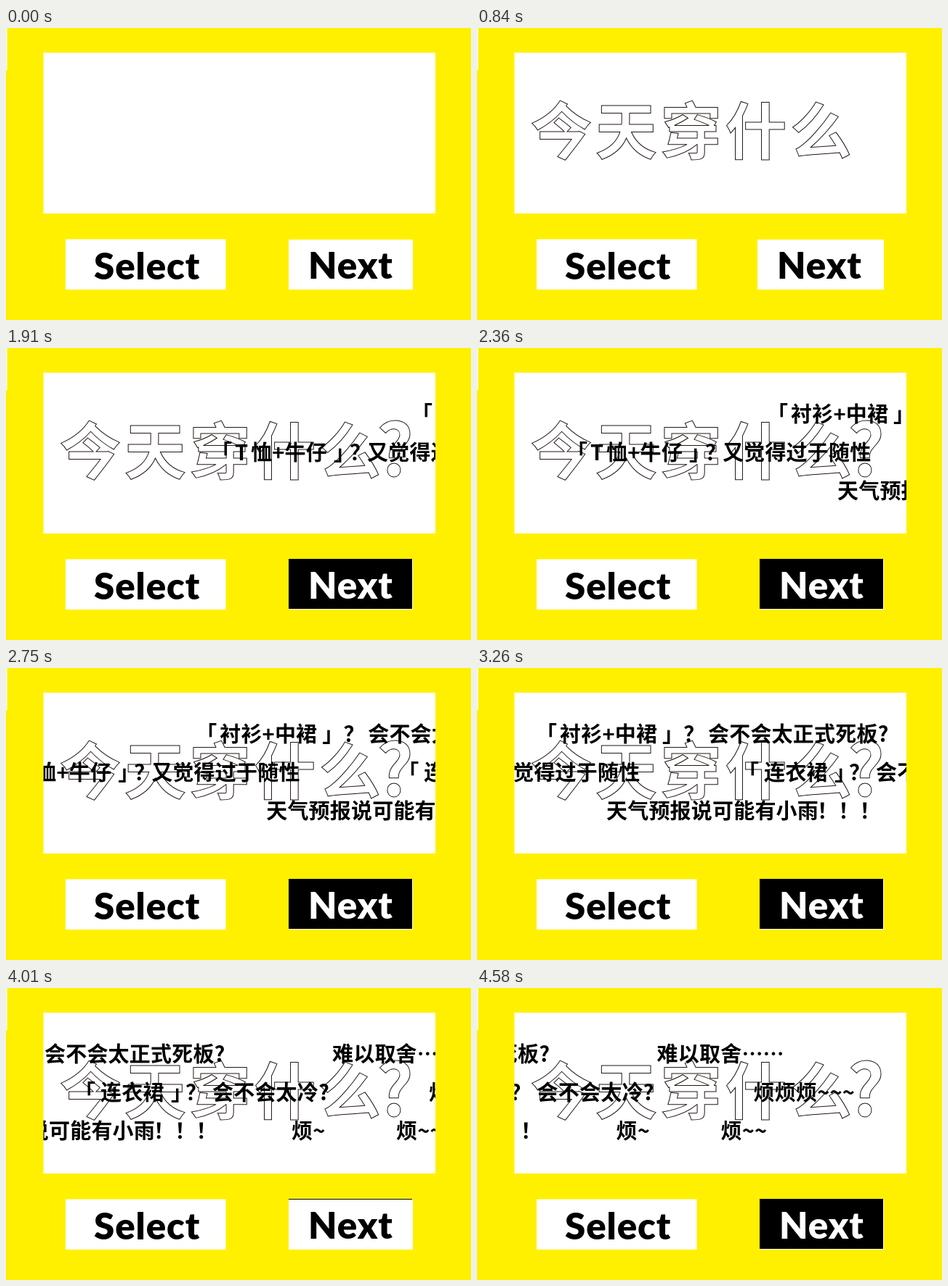
These frames come from a looping animation (640x403 px, 4610 ms). An HTML page:

```html
<!DOCTYPE html>
<html lang="zh-CN">
<head>
<meta charset="utf-8">
<style>
html, body { margin: 0; width: 100%; height: 100%; overflow: hidden; background: #fff000; }
svg { display: block; width: 640px; height: 403px; }
text { white-space: pre; }
.label { font: 900 51px Lato, sans-serif; letter-spacing: .9px; }
.title { font: 900 85px "Noto Sans CJK SC", "Noto Sans CJK", sans-serif; fill: none; stroke: #231815; stroke-width: 1; }
.row { font: 700 29px "Noto Sans CJK SC", "Noto Sans CJK", sans-serif; letter-spacing: .2px; }
</style>
</head>
<body>
<svg viewBox="0 0 640 403">
  <defs><clipPath id="screen"><rect x="51.5" y="34" width="539.5" height="222"/></clipPath></defs>
  <rect width="640" height="403" fill="#fff000"/>
  <rect width="1.5" height="58" fill="#fff"/>
  <rect x="51.5" y="34" width="539.5" height="222" fill="#fff"/>
  <rect x="82" y="291.5" width="220.5" height="69.5" fill="#fff"/>
  <text class="label" x="121" y="347">Select</text>
  <g clip-path="url(#screen)">
    <g id="title"></g>
    <g id="rows"></g>
  </g>
  <rect id="back" y="292" height="69" fill="#fff"/>
  <rect id="face" y="291" width="170" height="69"/>
  <text id="next" class="label" y="346">Next</text>
</svg>
<script>
const LOOP = 4610, SPEED = 10.6, ANCHOR = 130;
const $ = id => document.getElementById(id);

function addText(parent, cls, x, y, content) {
  const el = document.createElementNS("http://www.w3.org/2000/svg", "text");
  el.setAttribute("class", cls);
  set(el, { x, y });
  el.textContent = content;
  return parent.appendChild(el);
}

function set(el, attrs) {
  for (const key in attrs) el.setAttribute(key, attrs[key]);
}

const letters = [..."今天穿什么"].map((c, i) => addText($("title"), "title", 73.5 + 89.3 * i, 174, c));
const mark = addText($("title"), "title", 510, 177, "?");
mark.style.font = '700 99px "Noto Sans CJK SC", "Noto Sans CJK", sans-serif';
letters.push(mark);

// Phrases by row: baseline, then [x at the anchor tick, text]
const rows = [
  [102, [-184, "「"], [-151, "衬衫+中裙"], [-10, "」？"], [53, "会不会太正式死板?"], [449, "难以取舍……"]],
  [155, [-460, "「"], [-427, "T"], [-405, "恤+牛仔"], [-291, "」"], [-269, "？"], [-245, "又觉得过于随性"],
    [94, "「"], [130, "连衣裙"], [227, "」"], [247, "？"], [284, "会不会太冷?"], [582, "烦烦烦~~~"]],
  [208, [-87, "天气预报说可能有小雨"], [203, "！！！"], [393, "烦~"], [537, "烦~~"]]
];
for (const [y, ...phrases] of rows)
  for (const [x, phrase] of phrases) addText($("rows"), "row", x, y, phrase);

// The opening runs slightly slower than the scrolling part
const tickAt = t => Math.floor(t < 1010 ? Math.min(t / 33.5, 29) : 30 + (t - 1010) / 30 + 1e-6);

function drawButton(tick) {
  const phase = tick % 15;
  const pressed = tick >= 13 && (phase >= 13 || phase < 3);
  const late = tick >= 28;
  const shifted = tick >= 13 && !late;
  const left = shifted ? 386 : 389;
  set($("back"), { x: left, width: 560 - left });
  set($("face"), {
    x: left,
    height: pressed ? 69 : 1,
    visibility: pressed || late ? "visible" : "hidden"
  });
  set($("next"), { x: shifted ? 413 : 416, fill: pressed ? "#fff" : "#000" });
}

function draw(now) {
  const tick = tickAt(now % LOOP);
  letters.forEach((el, i) => set(el, { visibility: tick >= 5 * (i + 1) ? "visible" : "hidden" }));
  set($("rows"), {
    transform: `translate(${(ANCHOR - tick) * SPEED} 0)`,
    visibility: tick >= 32 ? "visible" : "hidden"
  });
  drawButton(tick);
}

const start = performance.now();
function loop() {
  draw(performance.now() - start);
  requestAnimationFrame(loop);
}
loop();
</script>
</body>
</html>
```
